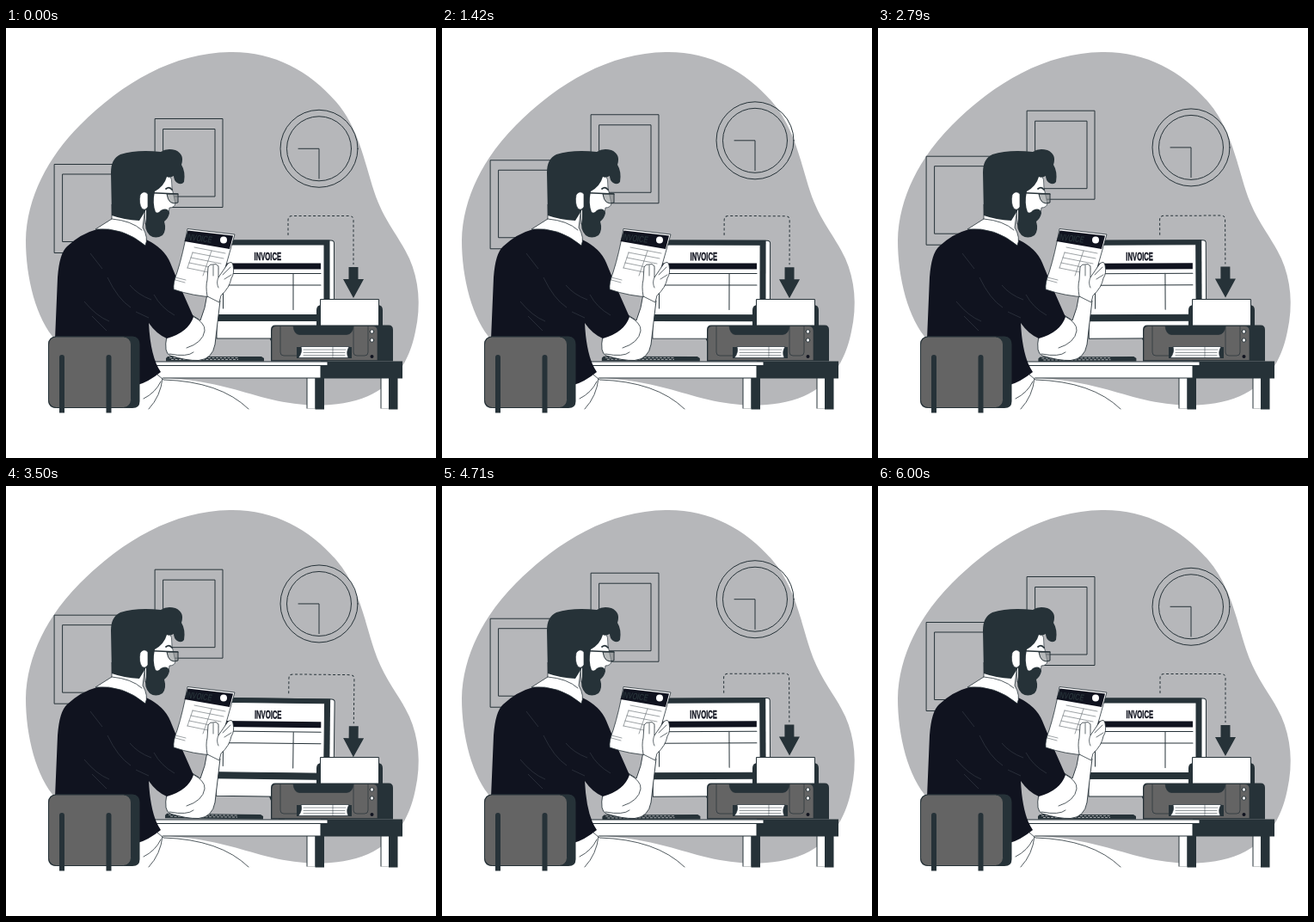
An HTML page that plays this animation: 500x500 px, repeating every 6.04 s.

```html
<!DOCTYPE html>
<html lang="en">
<head>
<meta charset="utf-8">
<title>Invoice printing</title>
<style>
  html, body { margin: 0; width: 100%; height: 100%; overflow: hidden; background: #fff; }
  svg { display: block; width: 100%; height: 100%; }
  .line { fill: none; stroke: #263238; stroke-linecap: round; stroke-linejoin: round; }
  .paper { fill: #fff; stroke: #263238; stroke-linejoin: round; }
  .dark { fill: #263238; }
  .ink { fill: #10131f; }
  .grey { fill: #646464; stroke: #263238; }
  .fold { fill: none; stroke: #39404a; stroke-width: .6; }
  text { font: bold 13.4px "Liberation Sans", Arial, sans-serif; text-anchor: middle; }
</style>
</head>
<body>
<svg viewBox="0 0 500 500">
  <path fill="#b6b7ba" d="M260 28C310 27 352 49 384 86C409 115 416 152 428 190C439 224 457 242 469 268C480 293 483 322 476 353C469 388 452 414 421 428C385 443 343 440 309 432C276 424 248 413 208 409C150 404 98 390 58 363C35 339 23 290 23 247C24 197 49 150 86 113C136 63 195 29 260 28Z"/>

  <g id="pictures" class="line">
    <path d="M173.500 105.500H252V208.500H173.500ZM183 117.500H243V196H183ZM56.500 158.500H135V261.500H56.500ZM66 170H126V248.500H66Z"/>
  </g>

  <g id="clock" class="line">
    <circle cx="364" cy="140.300" r="45"/>
    <circle cx="364" cy="140.300" r="37.500"/>
    <path d="M340 140.300H364V175"/>
  </g>

  <g id="computer">
    <path class="dark" d="M304 355H325V387H318Z"/>
    <path class="paper" d="M250 247H378Q381.500 247 381.500 250V357Q381.500 361 378 361H245V247Z"/>
    <path class="dark" d="M245 246.500H376.500V341H245Z"/>
    <path class="paper" d="M246 252H370V333.500H246Z"/>
    <path class="ink" d="M252 273.500H366V280.500H252Z"/>
    <path class="line" d="M252 285.500H366M252 299H366M334 285.500V327.500M252.500 285.500V326"/>
    <text class="ink" stroke="#10131f" stroke-width=".4" transform="translate(304.300 270.300) scale(.575 1)">INVOICE</text>
    <path class="line" stroke-dasharray="3 2.500" style="stroke-linecap:butt" d="M328 241V223.500Q328 218.500 333 218.500H399Q404 218.500 404 223.500V275"/>
    <path class="dark" d="M398.500 278H409.500V292H416L404 314L392 292H398.500Z"/>
    <path class="dark" d="M188 382H297L300 384V387.500H186V384Z"/>
    <path class="line" style="stroke:#b6b7ba;stroke-linecap:butt" stroke-width=".9" stroke-dasharray="3 1.500" d="M190 383.500H270M192 385.500H270"/>
  </g>

  <g id="desk">
    <path class="paper" d="M350 404H360V443H350ZM436 404H446V443H436Z"/>
    <path fill="#fff" d="M349 442.500H361V445H349ZM435 442.500H447V445H435Z"/>
    <path class="dark" d="M359.500 405H370V443.500H359.500ZM445 405H455.500V443.500H445ZM366 387.500H461V407.500H366Z"/>
    <path class="paper" d="M160 392.500H366V407H160ZM160 388H374V392.500H160Z"/>
  </g>

  <g id="printer">
    <path class="dark" d="M361 346V328Q361 322 367 322H432Q438 322 438 328V346Z"/>
    <path class="paper" d="M365.500 315.500H433.500V347H365.500Z"/>
    <path class="dark" d="M313 345.500H445Q450 345.500 450 351V387.500H308V351Q308 345.500 313 345.500Z"/>
    <path class="grey" stroke-width=".7" d="M314 346.500H334Q335 356 341 356.500H396Q403 356 404 346.500H427Q432 347 432 352V386.500H309V352Q309 347 314 346.500Z"/>
    <path class="line" stroke-width=".7" d="M319 347V377Q319 381 323 381H340M404 347V377Q404 381 408 381H417Q421 381 421 377V347"/>
    <path class="dark" d="M338 371H402V384H338Z"/>
    <path class="paper" stroke-width=".7" d="M343 370.500H399Q395 377 398 383.500H340Q345 377 343 370.500Z"/>
    <path class="line" stroke-width=".5" d="M346 374H395M346 377.500H394M346 380.500H394M380 371V383"/>
    <circle class="paper" cx="425.500" cy="353" r="2.200"/>
    <circle class="paper" cx="425.500" cy="363" r="2.200"/>
    <circle fill="#10131f" cx="425.500" cy="382" r="2"/>
  </g>

  <g id="man">
    <path fill="#fff" d="M150 413L180 400L183 408Q249 411 282 443V446H150Z"/>
    <path class="line" stroke-width=".8" d="M176 403L183 409Q249 411 282 443M182 407Q180 428 166 443M180 411Q174 424 160 431"/>

    <path class="paper" stroke-width=".9" d="M187 358Q183 378 191 381Q210 387 224 386.500Q240 385 243 368L249 317L234 309Q232 326 226 340L215 333Z"/>
    <path class="line" stroke-width=".8" d="M217 335Q232 343 231 352Q229 366 210 372M190 379Q211 383 218 377"/>
    <path class="ink" d="M106 234Q87 239 71 254Q62 262 60 290L57 362L153 415Q165 412 180 400Q168 383 166 343Q175 356 187 361Q212 354 218 336L203 302L191 273Q184 256 163 246L130 230Z"/>
    <path class="fold" d="M98 262L112 280M118 290Q130 315 145 325M91 318Q105 335 120 341M144 299Q153 310 169 316M151 330L166 337M172 310Q180 325 196 334M100 335L117 352"/>

    <path class="paper" stroke-width=".8" d="M123 205V222L104 234Q136 231 162 253Q166 244 159 232L162 208Z"/>
    <path class="line" stroke-width=".8" d="M123 222Q146 224 158 235"/>
    <path class="paper" stroke-width=".7" d="M160 180L189 168Q194 176 193 186L197 204Q196 209 190 209L189 216L180 228H162Z"/>
    <path class="dark" d="M123 218L122 168Q122 152 133 147Q152 141 180 144Q187 139 197 142Q208 147 204 159Q209 167 207 179Q204 183 199 180Q195 177 195 172Q190 175 187 173Q184 184 173 190Q170 204 174 214Q177 216 180 212Q188 208 190 215Q189 221 184 225Q187 235 182 241Q174 246 167 241Q160 234 163 222L163 211L155 224Q137 223 123 218Z"/>
    <path class="paper" stroke-width=".7" d="M165 193Q160 188 156 194Q154 204 158 210Q162 213 165 208Z"/>
    <path class="line" stroke-width="1.800" d="M186 187Q190 184 193 188"/>
    <path class="line" stroke-width="1.300" d="M165 191.500L200 193"/>
    <path fill="#888d90" fill-opacity=".6" stroke="#263238" d="M187 193H200V203Q189 207 187 193Z"/>

    <path class="paper" stroke-width=".8" d="M211 233.500L266 240L249 300L243 313Q218 312 195 304Q194 297 199 284Q206 262 211 233.500Z"/>
    <path class="ink" d="M211.500 235.500L264 241.500L260 257L207.500 248Z"/>
    <text class="dark" transform="translate(223.500 248) rotate(7) skewX(-8) scale(.55 .8)">INVOICE</text>
    <circle fill="#fff" cx="253" cy="246.500" r="4"/>
    <path class="line" stroke-width=".45" d="M219 255L255 262M217 261L253 268M215 267L250 274M213 273L247 280M211 279L245 286M217 261L211 279M239 259L229 288M197 290L209 293M197 293L208 296"/>
    <path class="paper" stroke-width=".8" d="M234 312Q232 300 234 293L235 278Q237 274 241 275Q244 273 247 277L247 290L258 274Q263 270 264 276Q266 285 262 291Q260 302 250 311L248 319Z"/>
    <path class="line" stroke-width=".7" d="M247 290Q244 296 247 302M241 276V288M252 287L261 278M254 292L262 287"/>
  </g>

  <g id="chair">
    <path class="dark" d="M59 358.500H147Q155.500 359 155.500 368V434Q155.500 442 147 442H59Q49 442 49 433V368Q49 358.500 59 358.500Z"/>
    <rect class="grey" x="49.500" y="359" width="96" height="82.500" rx="9"/>
    <path class="dark" d="M62 447.500V383Q62 380 65 380T68 383V447.500ZM116.500 447.500V383Q116.500 380 119.500 380T122.500 383V447.500Z"/>
  </g>
</svg>
<script>
  const LOOP = 6040, SLOW = 6000, FAST = 3000;
  const [pictures, clock, computer] =
    ["pictures", "clock", "computer"].map(id => document.getElementById(id));

  // Linear rise of 10 units and back within one period.
  const float = (t, period) => 10 * Math.abs(2 * (t % period) / period - 1) - 10;

  // Linear swing through 0, 1, -1, 0 degrees within one period.
  const swing = (t, period) => {
    const p = t % period / period;
    return p < .25 ? 4 * p : p < .75 ? 2 - 4 * p : 4 * p - 4;
  };

  const start = performance.now();
  function draw(now) {
    const t = Math.max(0, now - start) % LOOP;
    pictures.setAttribute("transform", `translate(0 ${float(t, SLOW)})`);
    clock.setAttribute("transform", `translate(0 ${float(t, FAST)})`);
    computer.setAttribute("transform", `rotate(${swing(t, FAST)} 301 303)`);
    requestAnimationFrame(draw);
  }
  draw(start);
</script>
</body>
</html>
```
